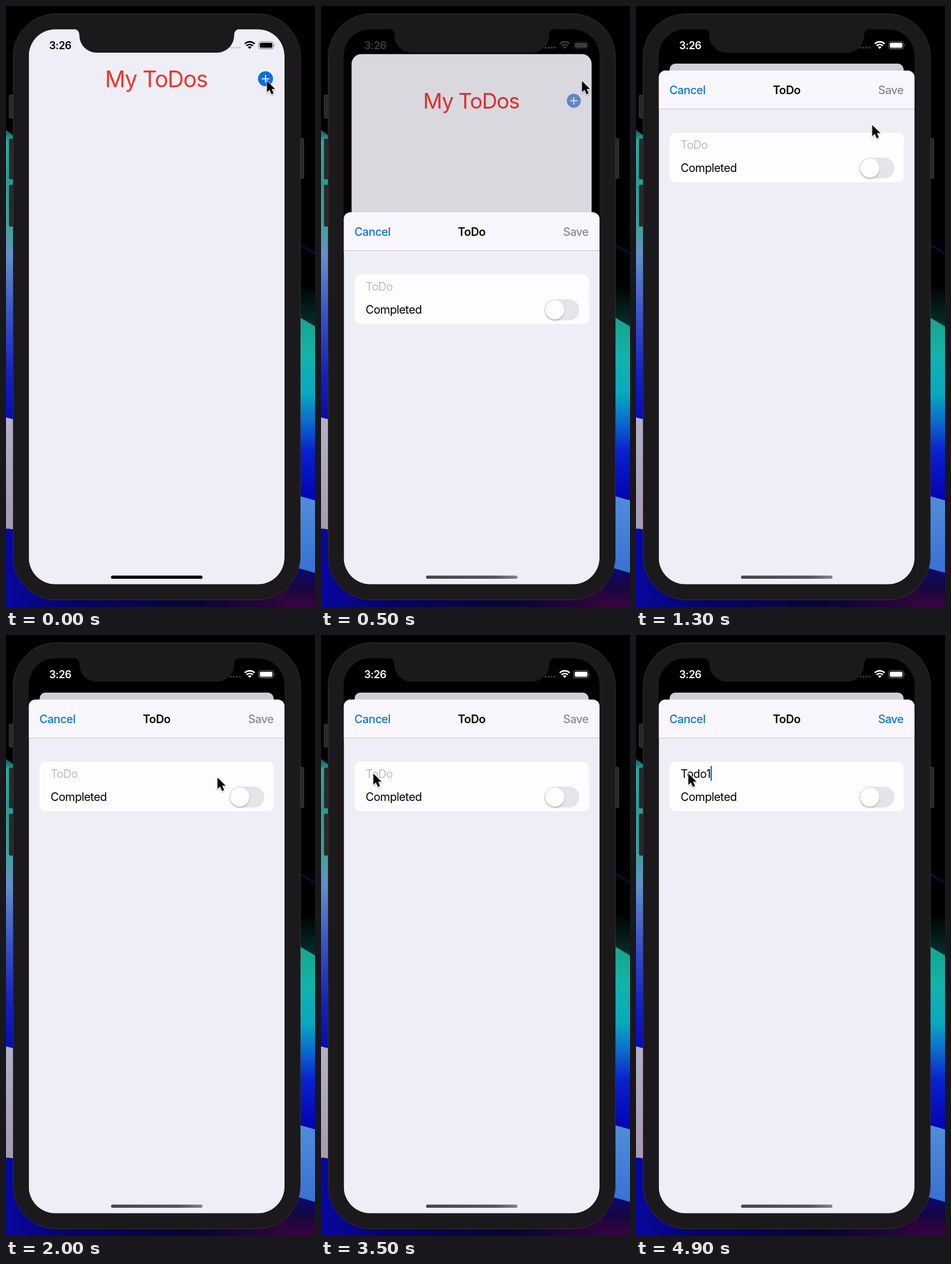
Write an HTML page that moves like this. It is 537 px wide and 1043 px high and loops after 5 s.

```html
<!DOCTYPE html>
<html lang="en">
<head>
<meta charset="utf-8">
<title>To-do sheet</title>
<style>
  html, body { margin: 0; width: 100%; height: 100%; overflow: hidden; background: #000; }
  svg { display: block; width: 537px; height: 1043px; }
  text { font: 19.8px Inter, "Open Sans", sans-serif; letter-spacing: -.025em; white-space: pre; }
  .semi { font-weight: 600; }
  .medium { font-weight: 500; }
</style>
</head>
<body>
<svg viewBox="0 0 537 1043">
  <defs>
    <linearGradient id="leftTop" gradientUnits="userSpaceOnUse" x1="0" y1="215" x2="0" y2="716">
      <stop offset="0" stop-color="#0b5a55"/>
      <stop offset=".04" stop-color="#30aaa0"/>
      <stop offset=".17" stop-color="#2a9a92"/>
      <stop offset=".35" stop-color="#459f9f"/>
      <stop offset=".43" stop-color="#6690c8"/>
      <stop offset=".62" stop-color="#3d57c9"/>
      <stop offset=".85" stop-color="#1420bd"/>
      <stop offset="1" stop-color="#090bb4"/>
    </linearGradient>
    <linearGradient id="leftBand" x2="0" y2="1">
      <stop offset="0" stop-color="#b3b0c6"/>
      <stop offset="1" stop-color="#a799b3"/>
    </linearGradient>
    <linearGradient id="rightTop" gradientUnits="userSpaceOnUse" x1="524" y1="545" x2="515" y2="850">
      <stop offset="0" stop-color="#17a58d"/>
      <stop offset=".2" stop-color="#12b3ab"/>
      <stop offset=".42" stop-color="#08a9c0"/>
      <stop offset=".58" stop-color="#0a6acb"/>
      <stop offset=".75" stop-color="#0820cf"/>
      <stop offset="1" stop-color="#0504b4"/>
    </linearGradient>
    <linearGradient id="rightGlow" x2="0" y2="1">
      <stop offset="0" stop-color="#000"/>
      <stop offset="1" stop-color="#06302c"/>
    </linearGradient>
    <linearGradient id="rightBand" x2="0" y2="1">
      <stop offset="0" stop-color="#4f8edb"/>
      <stop offset="1" stop-color="#3871d4"/>
    </linearGradient>
    <linearGradient id="floor">
      <stop offset="0" stop-color="#0807a0"/>
      <stop offset=".2" stop-color="#05046a"/>
      <stop offset=".6" stop-color="#08052f"/>
      <stop offset="1" stop-color="#3a0540"/>
    </linearGradient>
    <linearGradient id="rightFloor" x2="0" y2="1">
      <stop offset="0" stop-color="#0a0a70"/>
      <stop offset=".5" stop-color="#160640"/>
      <stop offset="1" stop-color="#3a0540"/>
    </linearGradient>
    <linearGradient id="indicatorFade">
      <stop offset="0" stop-color="#46434e"/>
      <stop offset=".75" stop-color="#55525d"/>
      <stop offset="1" stop-color="#85828c"/>
    </linearGradient>
    <clipPath id="screen"><rect x="39.5" y="40.5" width="444.5" height="963" rx="46"/></clipPath>
    <filter id="soft" x="-50%" y="-50%" width="200%" height="200%">
      <feDropShadow dx="0" dy="2" stdDeviation="1.8" flood-opacity=".25"/>
    </filter>
  </defs>

  <!-- wallpaper -->
  <rect width="537" height="1043"/>
  <path d="M0 215 20 230V722L0 714Z" fill="url(#leftTop)"/>
  <path d="M0 714 20 719V909L0 907Z" fill="url(#leftBand)"/>
  <path d="M0 907 20 909 60 1000H537V1043H0Z" fill="url(#floor)"/>
  <path d="M505 411 537 430" stroke="#1b0a5c" stroke-width="2"/>
  <path d="M505 480 537 495V556L505 537Z" fill="url(#rightGlow)"/>
  <path d="M505 537 537 556V858L505 849Z" fill="url(#rightTop)"/>
  <path d="M505 849 537 858V984L505 975Z" fill="url(#rightBand)"/>
  <path d="M505 975 537 984V1043H480Z" fill="url(#rightFloor)"/>

  <!-- phone -->
  <g fill="#29282a" stroke="#3b3a3c">
    <rect x="5.5" y="154.5" width="12" height="40" rx="2"/>
    <rect x="5.5" y="230.5" width="12" height="70" rx="2"/>
    <rect x="5.5" y="310.5" width="12" height="72" rx="2"/>
    <rect x="505.5" y="229.5" width="12" height="70" rx="2"/>
  </g>
  <rect x="12.5" y="13.5" width="499" height="1017" rx="75" fill="#1b191c" stroke="#323133"/>

  <g clip-path="url(#screen)">
    <rect x="39" y="40" width="446" height="965"/>
    <g id="list">
      <rect id="listPage" x="39.5" y="40" width="444.5" height="964" fill="#efeef6"/>
      <text x="261" y="140.5" text-anchor="middle" fill="#f0342d" style="font-size:39.3px;letter-spacing:-.03em">My ToDos</text>
      <circle id="add" cx="451" cy="126.3" r="13"/>
      <path d="M445 126.3h12m-6-6v12" stroke="#fff" stroke-width="1.8" stroke-linecap="round"/>
      <rect id="dim" x="39" y="40" width="446" height="965"/>
    </g>

    <g id="sheet">
      <rect x="39.5" width="444.5" height="1000" rx="12" fill="#efeef6"/>
      <path d="M39.5 66.5V12a12 12 0 0 1 12-12H472a12 12 0 0 1 12 12V66.5Z" fill="#f9f7fd"/>
      <path d="M39 66.5H485" stroke="#c8c6cc"/>
      <text class="medium" x="58" y="40.5" fill="#0b74e5">Cancel</text>
      <text class="semi" x="261.8" y="40.5" text-anchor="middle">ToDo</text>
      <text class="medium" id="save" x="465" y="40.5" text-anchor="end">Save</text>
      <rect x="58.5" y="108" width="407" height="86" rx="10" fill="#fffdff"/>
      <text id="field" x="77.5" y="135.7"></text>
      <rect id="caret" y="115" width="2.5" height="26" rx="1.2" fill="#1673e6"/>
      <text x="77.5" y="176.2">Completed</text>
      <rect x="388" y="151" width="61" height="36.5" rx="18.2" fill="#e5e4e9"/>
      <circle cx="406.3" cy="169.2" r="16.5" fill="#fffdff" filter="url(#soft)"/>
    </g>
    <rect id="indicator" x="182.5" y="988.5" width="159" height="5.6" rx="2.8"/>
  </g>

  <path d="M116 39C123 40 127.500 43 127.500 51A30 30 0 0 0 157.500 81H366.500A30 30 0 0 0 396.500 51C396.500 43 401 40 408 39Z" fill="#1b191c"/>
  <g id="status">
    <text class="semi" x="75" y="74.500" style="font-size:18.2px">3:26</text>
    <path d="M423.500 74.500 420.300 71.300A4.500 4.500 0 0 1 426.700 71.300Z"/>
    <g fill="none" stroke-width="2.700">
      <path d="M418 69A7.800 7.800 0 0 1 429 69M415 65.700A12 12 0 0 1 432 65.700"/>
      <rect x="439" y="61.800" width="26" height="12.600" rx="3.800" stroke-width="1.100" opacity=".45"/>
    </g>
    <rect x="441" y="63.700" width="22" height="8.800" rx="2.300"/>
    <path d="M466.300 66q1.600 2 0 4.200Z" opacity=".5"/>
  </g>
  <g id="signal">
    <circle cx="390.500" cy="72.300" r="1.800"/><circle cx="395.700" cy="72.300" r="1.800"/>
    <circle cx="400.900" cy="72.300" r="1.800"/><circle cx="406.100" cy="72.300" r="1.800"/>
  </g>

  <path id="cursor" d="M0 0V19.500L4.500 15.400 8 23.200 11.600 21.600 8.200 14H14.200Z" stroke="#fff" stroke-width="1.500" paint-order="stroke" filter="url(#soft)"/>
</svg>
<script>
const LOOP = 5000, STEP = 100;
const SHEET_TOP = 112, SHEET_HIDDEN = 1004, SHEET_START = 368, SPRING = 0.01937;
const TYPING_START = 4400, ENTRY = "Todo1";

// time, x, y of the pointer tip
const pointerPath = [
  [900, 453.500, 130], [1250, 412, 205], [1700, 367.500, 247.500],
  [2100, 367.500, 247.500], [2700, 94, 231.500], [3100, 94, 231.500], [3500, 91, 240.500]
];

const el = id => document.getElementById(id);
const set = (id, attributes) => {
  for (const name in attributes) el(id).setAttribute(name, attributes[name]);
};
const clamp = v => Math.max(0, Math.min(1, v));
const mix = (a, b, k) => a + (b - a) * k;
const gray = v => `rgb(${v},${v},${v})`;

// critically damped spring from 0 to 1
function spring(elapsed) {
  const x = SPRING * Math.max(0, elapsed);
  return 1 - (1 + x) * Math.exp(-x);
}

function pointerAt(t) {
  const next = pointerPath.findIndex(p => p[0] > t);
  if (next === 0) return pointerPath[0].slice(1);
  if (next < 0) return pointerPath.at(-1).slice(1);
  const [t0, x0, y0] = pointerPath[next - 1], [t1, x1, y1] = pointerPath[next];
  const k = (t - t0) / (t1 - t0), eased = k * k * (3 - 2 * k);
  return [mix(x0, x1, eased), mix(y0, y1, eased)];
}

function drawTransition(t) {
  const p = spring(t - SHEET_START);
  const scale = mix(1, 0.915, p);
  set("list", { transform: `translate(261.75 ${mix(40, 100, p)}) scale(${scale}) translate(-261.75 -40)` });
  const radius = mix(46, 11, clamp(p * 1.1));
  set("listPage", { rx: radius });
  set("dim", { rx: radius, opacity: 0.13 * p });
  set("add", { fill: p > 0 ? `rgb(${mix(10, 138, p)},${mix(108, 168, p)},${mix(240, 205, p)})` : "#0a6cf0" });
  set("sheet", { transform: `translate(0 ${mix(SHEET_HIDDEN, SHEET_TOP, p)})` });
  set("indicator", { fill: p > 0.3 ? "url(#indicatorFade)" : "#000" });

  const light = clamp((t - 440) / 250);
  const ink = gray(Math.round(255 * light));
  set("status", { fill: ink, stroke: "none" });
  el("status").querySelector("g").setAttribute("stroke", ink);
  set("signal", { fill: p > 0.3 ? "#3a393c" : "#c3c2c9" });
}

function drawField(t) {
  const count = Math.max(0, Math.min(ENTRY.length, Math.floor((t - TYPING_START) / STEP) + 1));
  const field = el("field");
  field.textContent = count ? ENTRY.slice(0, count) : "ToDo";
  set("field", { fill: count ? "#000" : "#bfbdc4" });
  set("save", { fill: count ? "#0b74e5" : "#8b8990" });
  const visible = count ? 1 : t < 3600 ? 0 : clamp((4165 - t) / 200);
  set("caret", { x: count ? 77.500 + field.getComputedTextLength() : 77, opacity: visible });
}

function render(now) {
  const t = Math.floor((now % LOOP) / STEP) * STEP;
  drawTransition(t);
  drawField(t);
  set("cursor", { transform: `translate(${pointerAt(t)})` });
  requestAnimationFrame(render);
}
render(0);
</script>
</body>
</html>
```
